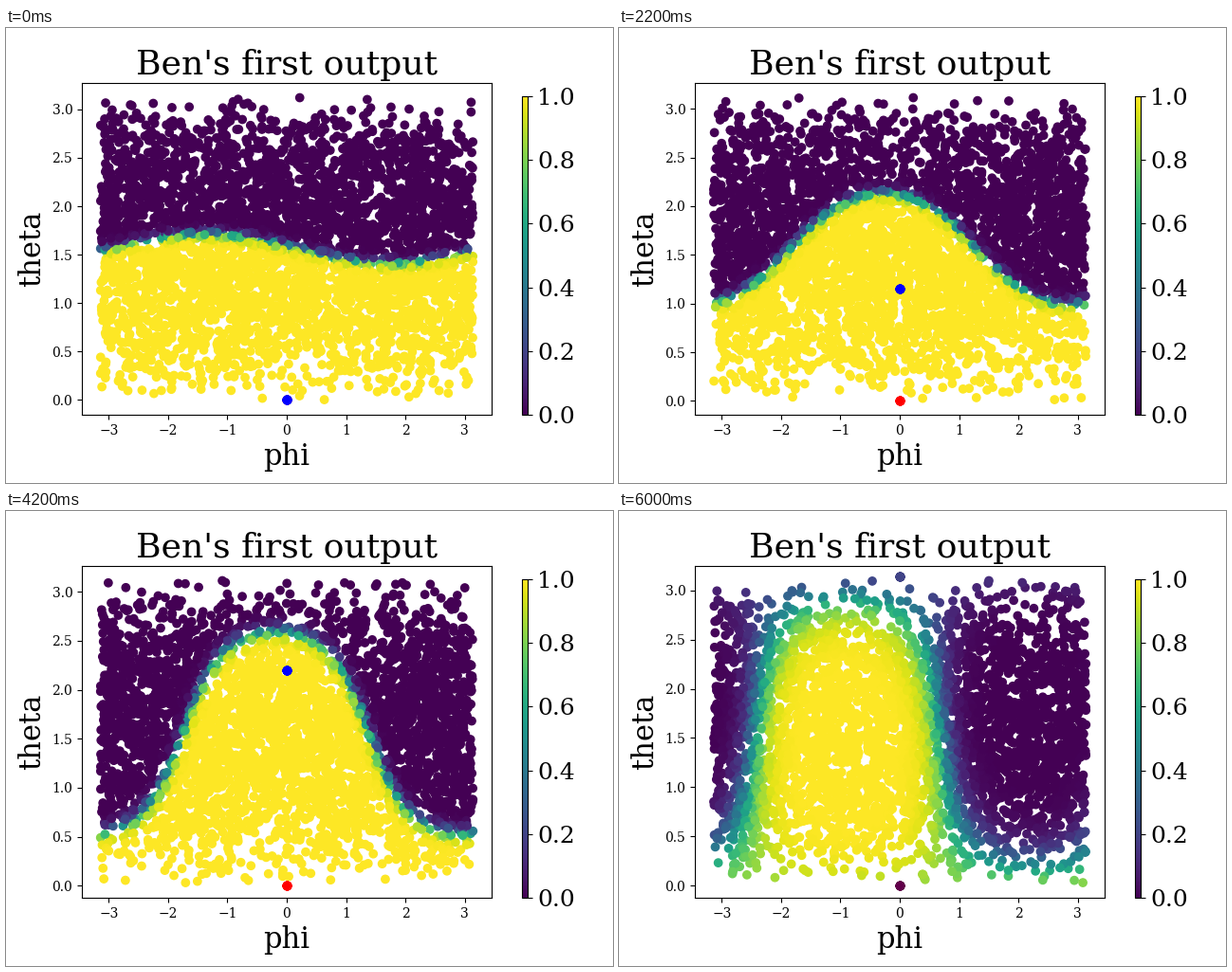
Animation, 640 px wide and 480 px high, one loop 6.2 s. Source, as a matplotlib script:

```python
import numpy as np
import matplotlib.pyplot as plt
from matplotlib.animation import FuncAnimation

FRAMES, INTERVAL = 31, 200
POINTS, COPIES = 4000, 20
DRIFT = np.array([0.025, -0.15, 0])

plt.rcParams["font.family"] = "DejaVu Serif"


def on_sphere(theta, phi):
    return np.array([np.sin(theta) * np.cos(phi),
                     np.sin(theta) * np.sin(phi),
                     np.cos(theta)])


def output(theta, phi, p):
    """Network output at progress p: a soft half-space that tilts with the blue dot."""
    swing = p ** 12  # late turn and softening near the pole
    normal = on_sphere(1.45 * p - 0.1 * swing, -0.8 * swing) + DRIFT
    sharpness = 45 - 25 * p - 12.5 * swing
    return 1 / (1 + np.exp(-sharpness * (normal @ on_sphere(theta, phi))))


fig, ax = plt.subplots(figsize=(6.4, 4.8), dpi=100)
fig.subplots_adjust(left=0.125, right=0.8, bottom=0.15, top=0.88)
ax.set_title("Ben's first output", fontsize=26)
ax.set_xlabel("phi", fontsize=22)
ax.set_ylabel("theta", fontsize=22)
ax.set_xlim(-1.1 * np.pi, 1.1 * np.pi)

cloud = ax.scatter(np.zeros(POINTS), np.zeros(POINTS), c=np.zeros(POINTS),
                   cmap="viridis", vmin=0, vmax=1)


def marker(color):
    # Stacked copies give the crisp edge
    return ax.scatter(np.zeros(COPIES), np.zeros(COPIES), color=color, zorder=3)


red, blue = marker("red"), marker("blue")

bar = fig.colorbar(cloud, cax=fig.add_axes([0.85, 0.15, 0.01, 0.7]))
bar.ax.tick_params(labelsize=18)


def update(step):
    p = step / (FRAMES - 1)
    rng = np.random.default_rng(step)
    phi = rng.uniform(-np.pi, np.pi, POINTS)
    theta = np.arccos(rng.uniform(-1, 1, POINTS))
    cloud.set_offsets(np.column_stack([phi, theta]))
    cloud.set_array(output(theta, phi, p))

    margin = 0.05 * np.ptp(theta)
    ax.set_ylim(theta.min() - margin, theta.max() + margin)

    blue.set_offsets(np.tile([0, np.pi * p], (COPIES, 1)))
    arrived = p == 1
    red.set_color("#62004b" if arrived else "red")
    blue.set_color("#414487" if arrived else "blue")
    return cloud, red, blue


anim = FuncAnimation(fig, update, frames=FRAMES, interval=INTERVAL,
                     repeat=True, repeat_delay=0, blit=False)
plt.show()
```
